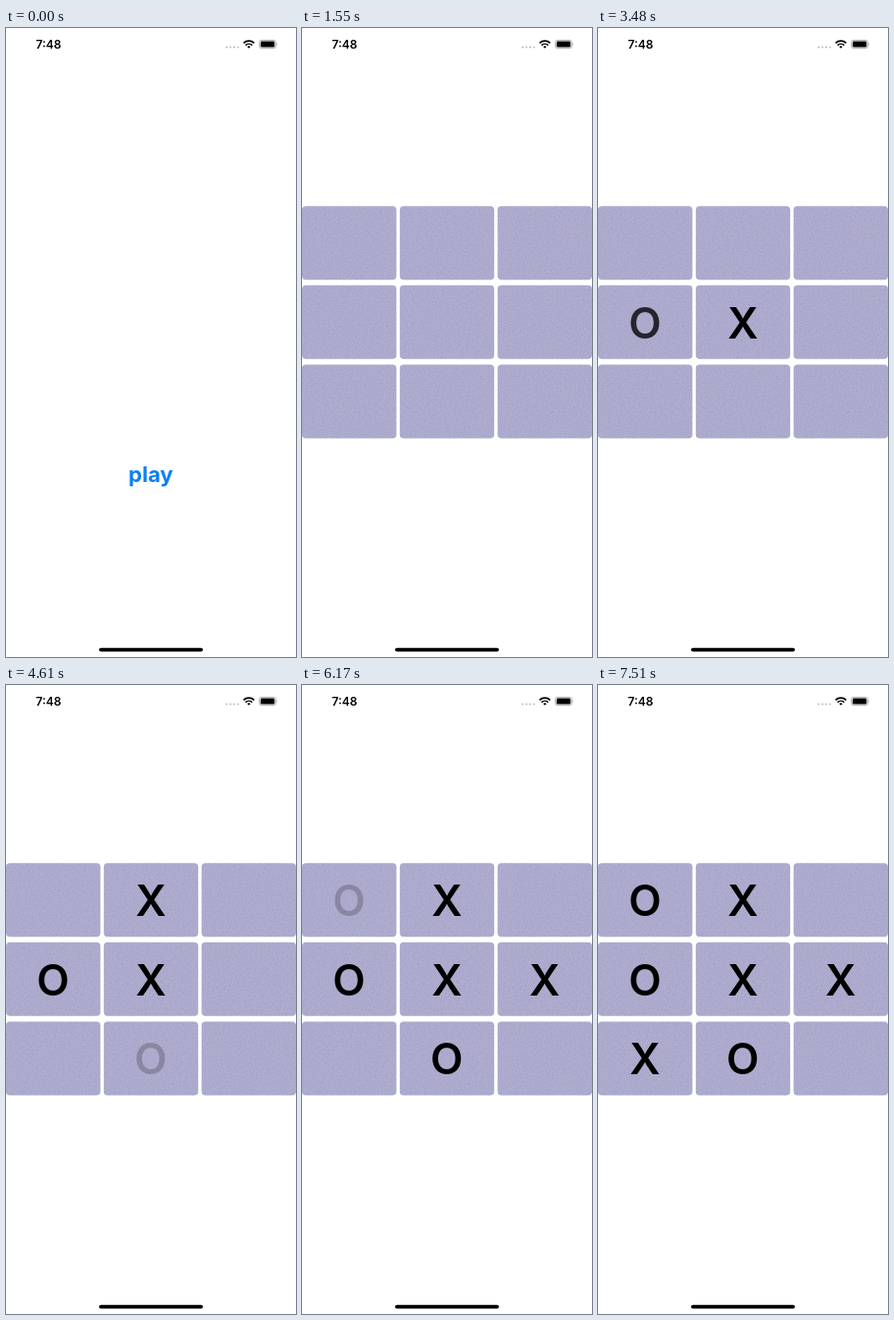
These frames come from a looping animation (296x640 px, 8000 ms). An HTML page:

```html
<!DOCTYPE html>
<html lang="en">
<head>
<meta charset="utf-8">
<title>Tic-tac-toe</title>
<style>
  html, body { margin: 0; width: 100%; height: 100%; overflow: hidden; background: #fff; }
  svg { display: block; }
  text { font-family: Inter, "Liberation Sans", sans-serif; font-weight: 600; text-anchor: middle; }
  #play { font-size: 22px; font-weight: 700; fill: #0a7ff5; }
  #marks { font-size: 43.5px; font-weight: 700; }
</style>
</head>
<body>
<svg width="296" height="640" viewBox="0 0 296 640">
  <defs>
    <filter id="paper" x="0" y="0" width="1" height="1" color-interpolation-filters="sRGB">
      <feTurbulence type="fractalNoise" baseFrequency=".7" numOctaves="2" seed="4"/>
      <feColorMatrix values="0 0 0 0 .45  0 0 0 0 .45  0 0 0 0 .6  .5 0 0 0 -.18"/>
      <feComposite in2="SourceGraphic" operator="in" result="grain"/>
      <feMerge><feMergeNode in="SourceGraphic"/><feMergeNode in="grain"/></feMerge>
    </filter>
  </defs>

  <text x="43.4" y="21" font-size="12">7:48</text>
  <g fill="#c4c4c6">
    <circle cx="225.2" cy="19.5" r="1.1"/><circle cx="229.1" cy="19.5" r="1.1"/>
    <circle cx="233" cy="19.5" r="1.1"/><circle cx="236.9" cy="19.5" r="1.1"/>
  </g>
  <g fill="none" stroke="#000" stroke-width="1.7">
    <path d="M242.5 15.3a7.7 7.7 0 0 1 10.8 0M244.5 17.6a4.9 4.9 0 0 1 6.8 0"/>
    <path d="M247.9 20.8l-1.7-1.8a2.4 2.4 0 0 1 3.4 0z" fill="#000" stroke="none"/>
  </g>
  <rect x="258.5" y="12.4" width="17" height="8.3" rx="2.4" fill="none" stroke="#a8a8a8" stroke-width=".9"/>
  <rect x="259.8" y="13.6" width="14.4" height="5.9" rx="1.3"/>
  <path d="M276.5 15.2q1.3 1.3 0 2.7z" fill="#a8a8a8"/>

  <text id="play" x="147.8" y="462">play</text>
  <g id="board">
    <g id="tiles" fill="#b1afd1" filter="url(#paper)"></g>
    <g id="marks"></g>
  </g>
  <rect x="95" y="630.7" width="106" height="3.8" rx="1.9"/>
</svg>
<script>
const LOOP = 8000, PRESS = 500, START = 1550;
const FADE = [.2, .5, .78, .94, 1];
// mark, column, row, fade start, fade length
const moves = [
  ['X', 1, 1, 1660, 440],
  ['O', 0, 1, 3260, 450],
  ['X', 1, 0, 3900, 420],
  ['O', 1, 2, 4610, 440],
  ['X', 2, 1, 5360, 410],
  ['O', 0, 0, 6170, 440],
  ['X', 0, 2, 7090, 420]
];
const $ = id => document.getElementById(id);

function add(parent, tag, attrs) {
  const el = document.createElementNS('http://www.w3.org/2000/svg', tag);
  for (const key in attrs) el.setAttribute(key, attrs[key]);
  return parent.appendChild(el);
}

for (let i = 0; i < 9; i++)
  add($('tiles'), 'rect', {
    x: i % 3 * 99.8, y: 181.2 + Math.floor(i / 3) * 80.6,
    width: 96.4, height: 75, rx: 4
  });

const marks = moves.map(([mark, col, row]) => {
  const el = add($('marks'), 'text', { x: 48 + col * 99.8, y: 235 + row * 80.6 });
  el.textContent = mark;
  return el;
});

function draw(now) {
  const t = now % LOOP, playing = t >= START;
  $('play').style.opacity = playing ? 0 : t < PRESS ? 1 : .2;
  $('board').style.display = playing ? '' : 'none';
  moves.forEach(([, , , start, length], i) => {
    const step = Math.floor((t - start) / length * 4 + .1);
    marks[i].style.opacity = t < start ? 0 : FADE[Math.min(step, 4)];
  });
}

const begin = performance.now();
function tick() {
  draw(performance.now() - begin);
  requestAnimationFrame(tick);
}
tick();
</script>
</body>
</html>
```
